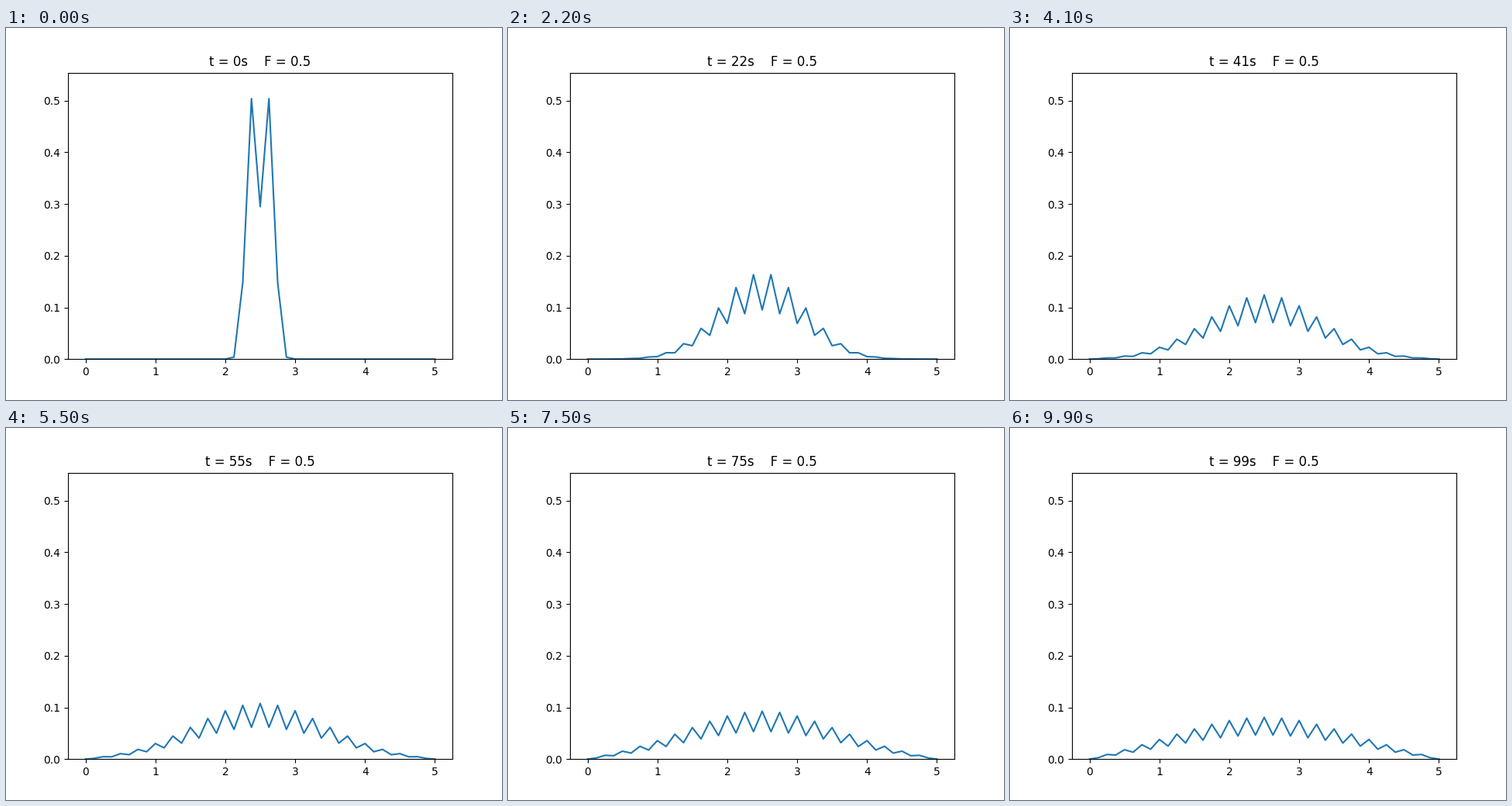
A matplotlib script that plays this animation: 640x480 px, repeating every 10 s.

```python
import numpy as np
import matplotlib.pyplot as plt
from matplotlib.animation import FuncAnimation

L, NX, SIGMA, F = 5.0, 40, 0.08, 0.5
FRAMES = 100

x = np.linspace(0, L, NX + 1)


def step(u):
    """One forward Euler step of the diffusion equation, ends held at zero."""
    new = np.zeros_like(u)
    new[1:-1] = u[1:-1] + F * (u[:-2] - 2 * u[1:-1] + u[2:])
    return new


def solve():
    u = np.exp(-0.5 * ((x - L / 2) / SIGMA) ** 2)
    history = []
    for _ in range(FRAMES):
        u = step(u)
        history.append(u)
    return history


states = solve()

fig, ax = plt.subplots(figsize=(6.4, 4.8), dpi=100)
line, = ax.plot(x, states[0])
ax.set_ylim(0, 1.1 * states[0].max())
title = ax.set_title("")


def update(i):
    line.set_ydata(states[i])
    title.set_text(f"t = {i}s    F = {F}")
    return line, title


anim = FuncAnimation(fig, update, frames=FRAMES, interval=100,
                     repeat=True, repeat_delay=0, blit=False)
plt.show()
```
